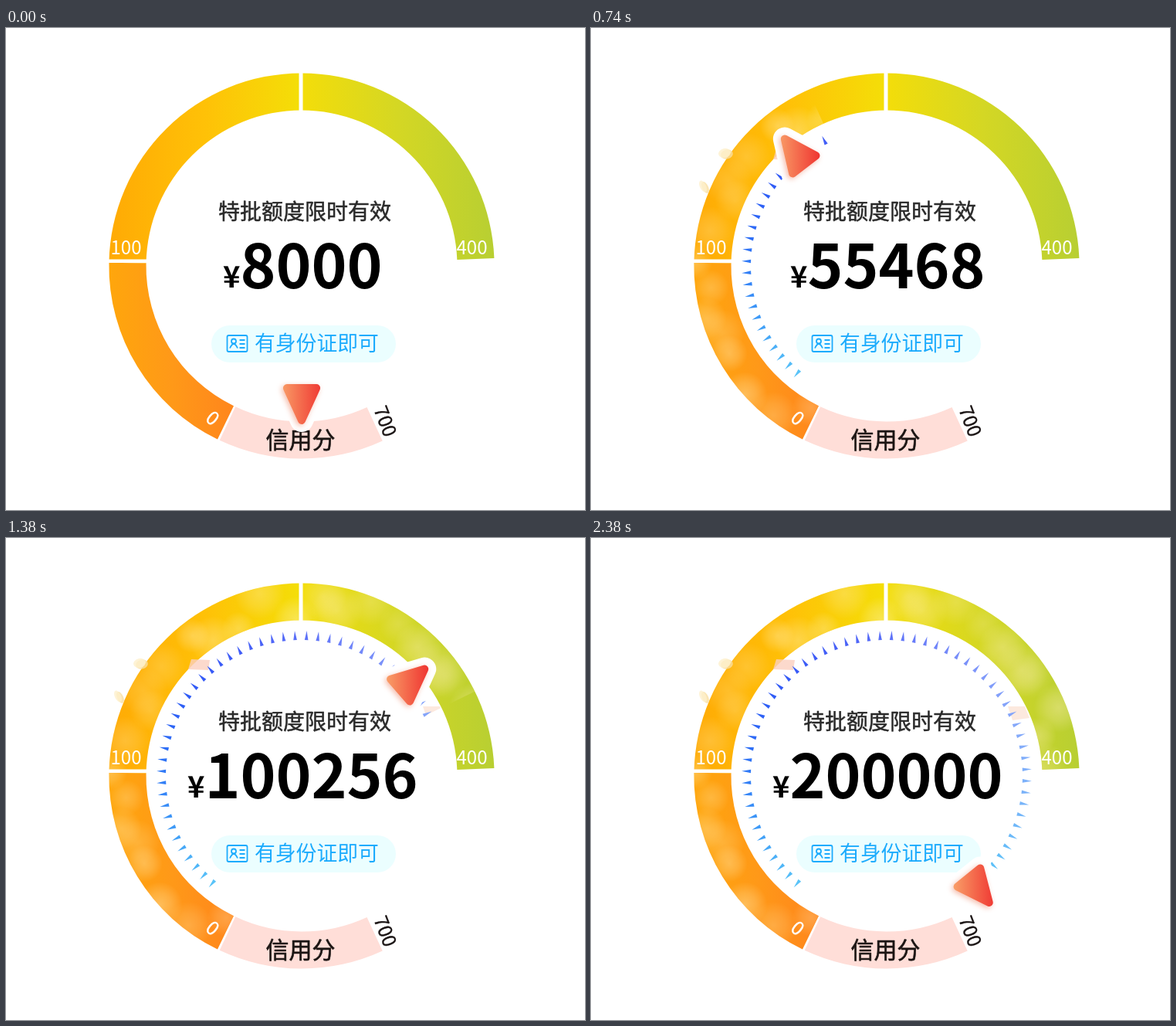
Recreate the animation shown at these times as an HTML page with a canvas. Size 750 by 624 pixels, loop 8 s.

```html
<!DOCTYPE html>
<html lang="zh-CN">
<head>
<meta charset="utf-8">
<style>
html, body { margin: 0; width: 100%; height: 100%; overflow: hidden; background: #fff; }
canvas { display: block; }
</style>
</head>
<body>
<canvas id="stage" width="750" height="624"></canvas>
<script>
const ctx = document.getElementById('stage').getContext('2d');
const FONT = '"Noto Sans CJK SC", "Noto Sans CJK", sans-serif';
const CX = 383, CY = 308, R = 249.6, HOLE = 201.5, LOOP = 8000, LAST = 28;
const BLUE = '#1cabfd';
const rad = d => d * Math.PI / 180;

// step, pointer angle, amount
const KEYS = [
  [0, 90, 8000], [3, 147, 23360], [9, 231, 55468], [14, 290, 89566],
  [17, 319, 100256], [24, 383, 179440], [LAST, 411, 200000]
];

function stepAt(t) {
  if (t < 100) return 0;
  return t >= 2380 ? LAST : Math.min(LAST - 1, Math.floor((t - 100) / 80) + 1);
}

function stateAt(step) {
  const i = Math.max(1, KEYS.findIndex(key => key[0] >= step));
  const a = KEYS[i - 1], b = KEYS[i], p = (step - a[0]) / (b[0] - a[0]);
  return a.map((v, n) => v + (b[n] - v) * p);
}

function seeded(seed) {
  return () => (seed = seed * 16807 % 2147483647) / 2147483647;
}

function at(angle, radius, x = CX, y = CY) {
  return [x + radius * Math.cos(rad(angle)), y + radius * Math.sin(rad(angle))];
}

function gradient(x0, x1, ...colors) {
  const g = ctx.createLinearGradient(x0, 0, x1, 0);
  colors.forEach((c, i) => g.addColorStop(i / (colors.length - 1), c));
  return g;
}

function band(from, to) {
  ctx.beginPath();
  ctx.arc(CX, CY, R, rad(from), rad(to));
  ctx.arc(CX, CY, HOLE, rad(to), rad(from), true);
  ctx.closePath();
}

function segment(from, to, fill) {
  band(from, to);
  ctx.fillStyle = fill;
  ctx.fill();
}

function poly(points, fill) {
  ctx.beginPath();
  points.forEach(p => ctx.lineTo(...p));
  ctx.closePath();
  ctx.fillStyle = fill;
  ctx.fill();
}

function text(str, x, y, size, weight, color, align = 'left', thicken = 0) {
  ctx.font = `${weight} ${size}px ${FONT}`;
  ctx.fillStyle = ctx.strokeStyle = color;
  ctx.textAlign = align;
  ctx.fillText(str, x, y);
  if (thicken) {
    ctx.lineWidth = thicken;
    ctx.strokeText(str, x, y);
  }
}

function turnedText(str, x, y, angle, color) {
  ctx.save();
  ctx.translate(x, y);
  ctx.rotate(rad(angle));
  text(str, 0, 9, 24, 400, color, 'center', .4);
  ctx.restore();
}

function ring() {
  segment(65.2, 115.2, '#ffded8');
  segment(115.9, 181, gradient(134, 294, '#ffa60c', '#ff9918', '#ff861c'));
  segment(181, 270, gradient(134, 380, '#ffaa05', '#ffc107', '#f4de08'));
  segment(270, 357.7, gradient(385, 632, '#f3dd0a', '#d4d724', '#b8cf32'));
}

function gaps() {
  ctx.fillStyle = '#fff';
  ctx.fillRect(130, 299.5, 54, 4.5);
  ctx.fillRect(379.5, 56, 5, 51);
}

// soft light patches scattered along the ring
function glows() {
  const rnd = seeded(77);
  ctx.save();
  band(115.9, 357.7);
  ctx.clip();
  for (let a = 118; a < 356; a += 9) {
    const [x, y] = at(a + rnd() * 6, HOLE + rnd() * 48);
    const r = 22 + rnd() * 14, light = .2 + rnd() * .2;
    const g = ctx.createRadialGradient(x, y, 0, x, y, r);
    g.addColorStop(0, `rgba(255,240,190,${light})`);
    g.addColorStop(.5, `rgba(255,240,190,${light * .6})`);
    g.addColorStop(1, 'rgba(255,240,190,0)');
    ctx.fillStyle = g;
    ctx.fillRect(x - r, y - r, 2 * r, 2 * r);
  }
  ctx.restore();
}

function coin(x, y, rx, ry, angle) {
  for (const [shift, color] of [[3, '#f9dfa0'], [0, '#fef1cc']]) {
    ctx.beginPath();
    ctx.ellipse(x + shift, y + shift / 2, rx, ry, rad(angle), 0, 7);
    ctx.fillStyle = color;
    ctx.fill();
  }
}

function pieces() {
  ctx.globalAlpha = .8;
  coin(173, 162, 8, 6, -15);
  coin(145, 205, 4, 8, -25);
  poly([[240, 157], [264, 158], [262, 171], [236, 170]], '#fcd0c0');
  poly([[540, 218], [562, 218], [568, 233], [546, 236]], '#fce4d6');
  ctx.globalAlpha = 1;
}

function star(x, y, turn) {
  const points = Array.from({ length: 10 }, (_, i) => at(turn + i * 36, i % 2 ? 2 : 4, x, y));
  poly(points, '#f47b0c');
}

function stars(to) {
  if (to <= 358) return;
  ctx.save();
  band(358, to);
  ctx.clip();
  for (let row = 0; row < 30; row++) {
    for (let col = 0; col < 16; col++) {
      star(480 + col * 10 + row % 2 * 5, 298 + row * 8.2 + col % 3, col * 17);
    }
  }
  ctx.restore();
}

function ticks(to) {
  const count = 58;
  for (let i = 0; i <= count; i++) {
    const angle = 129.8 + i * 4.74, p = i / count;
    if (angle > to) break;
    const hue = 200 + 32 * Math.sin(Math.PI * p);
    const light = 66 - 9 * Math.sin(2 * Math.PI * p);
    poly([at(angle, 188), at(angle - .75, 176), at(angle + .75, 176)], `hsl(${hue} 92% ${light}%)`);
  }
}

function labels() {
  text('100', 135.5, 293, 24, 400, '#fff');
  text('400', 583.5, 293, 24, 400, '#fff');
  turnedText('0', 268, 505, 40, '#fff');
  turnedText('700', 491.5, 509, 69, '#1a1414');
  text('信用分', 381.5, 543.5, 30, 400, '#1c1614', 'center', .6);
  text('特批额度限时有效', 387, 248, 28, 400, '#2a2a2a', 'center', .5);
}

function pill() {
  ctx.beginPath();
  ctx.roundRect(266, 385, 239, 48, 24);
  ctx.fillStyle = '#ebfeff';
  ctx.fill();
  text('有身份证即可', 322, 418, 26.8, 300, BLUE);
  ctx.strokeStyle = BLUE;
  ctx.lineWidth = 1.8;
  ctx.beginPath();
  ctx.roundRect(286.5, 398, 26, 21, 2);
  ctx.moveTo(298, 405.5);
  ctx.arc(295, 405.5, 3, 0, 7);
  ctx.moveTo(290, 414.5);
  ctx.quadraticCurveTo(295, 403.5, 300, 414.5);
  for (let y = 404; y < 418; y += 5) {
    ctx.moveTo(302.5, y);
    ctx.lineTo(309.5, y);
  }
  ctx.stroke();
}

function amount(value) {
  const digits = String(Math.round(value));
  ctx.font = `700 38px ${FONT}`;
  const sign = ctx.measureText('¥').width;
  ctx.font = `700 78px ${FONT}`;
  const x = 384.3 - (sign + ctx.measureText(digits).width) / 2;
  text('¥', x, 336, 38, 700, '#000');
  text(digits, x + sign, 337, 78, 700, '#000');
}

function pointer(angle, dir) {
  const [x, y] = at(angle, angle > 90 ? 181 : 170);
  const fill = gradient(x - 28, x + 28, '#f9a068', '#f4694c', '#ef3431');
  // the white halo first, then the rounded body with its shadow
  ctx.lineJoin = 'round';
  poly([at(dir, 30, x, y), at(dir + 122, 22.5, x, y), at(dir - 122, 22.5, x, y)], fill);
  ctx.strokeStyle = '#fff';
  ctx.lineWidth = 30;
  ctx.stroke();
  ctx.save();
  ctx.shadowColor = 'rgba(235,120,85,.5)';
  ctx.shadowBlur = 7;
  ctx.shadowOffsetX = -2;
  ctx.shadowOffsetY = 2;
  ctx.strokeStyle = fill;
  ctx.lineWidth = 10;
  ctx.stroke();
  ctx.restore();
  ctx.fill();
}

function draw(t) {
  const step = stepAt(t);
  const [, angle, value] = stateAt(step);
  const reveal = Math.max(116, angle + 15);
  // the pointer leans forward briefly as it sets off
  const lean = 23 * (step / 3 * Math.exp(1 - step / 3)) ** 3;

  ctx.fillStyle = '#fff';
  ctx.fillRect(0, 0, 750, 624);
  ring();

  ctx.save();
  ctx.beginPath();
  ctx.moveTo(CX, CY);
  ctx.arc(CX, CY, 300, rad(116), rad(reveal));
  ctx.clip();
  glows();
  pieces();
  ctx.restore();

  gaps();
  if (step < LAST) stars(reveal - 3);
  ticks(reveal);
  labels();
  pill();
  pointer(angle, angle + lean);
  amount(value);
}

let start;
function frame(now) {
  start ??= now;
  draw((now - start) % LOOP);
  requestAnimationFrame(frame);
}
requestAnimationFrame(frame);
</script>
</body>
</html>
```
